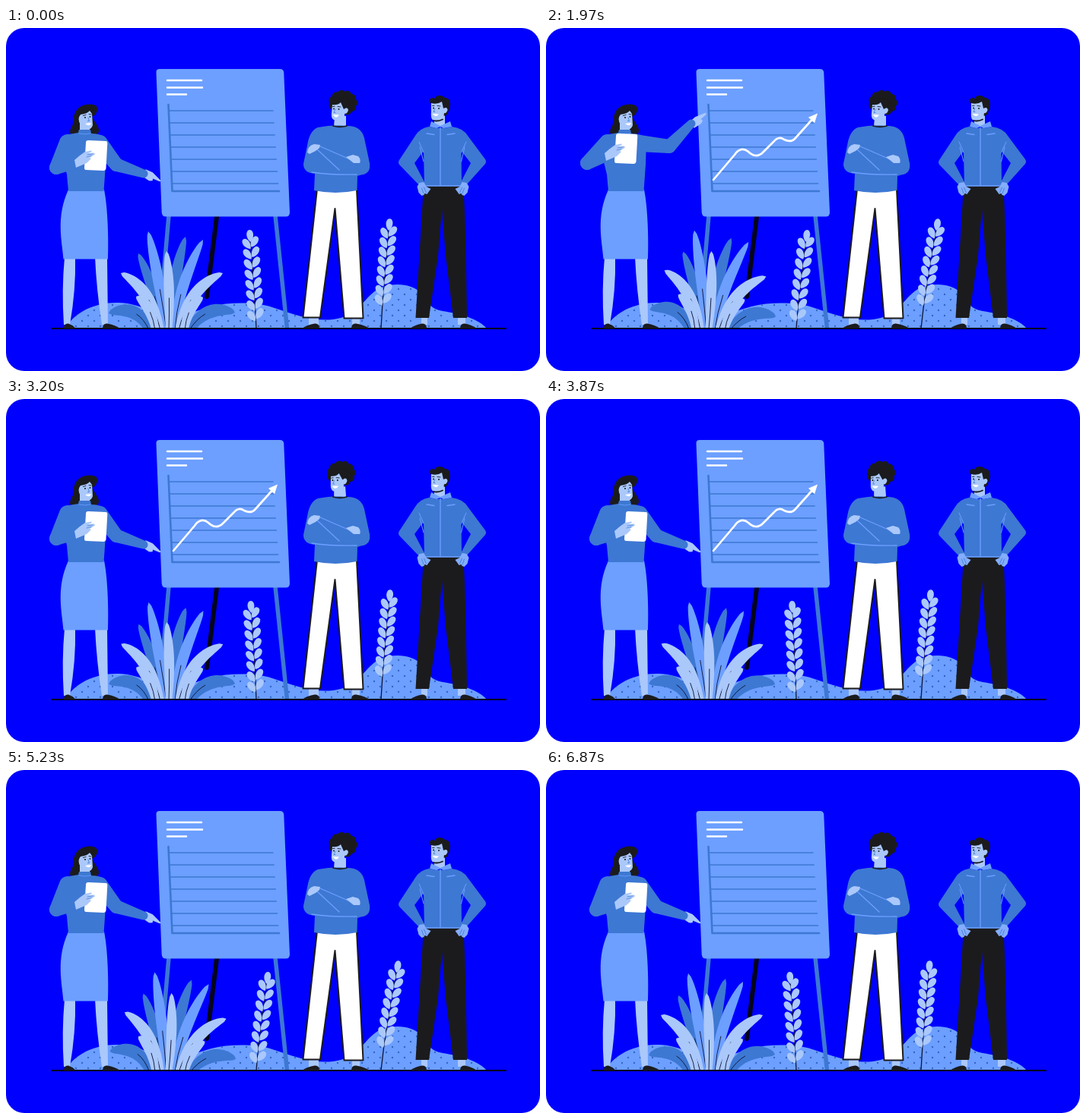
Recreate the animation shown at these times as an HTML page with a canvas. Size 702 by 452 pixels, loop 6930 ms.

```html
<!DOCTYPE html>
<html lang="en">
<head>
<meta charset="utf-8">
<title>Presentation</title>
<style>
  html, body { margin: 0; width: 100%; height: 100%; overflow: hidden; background: #fff; }
  canvas { display: block; }
</style>
</head>
<body>
<canvas id="stage" width="702" height="452"></canvas>
<script>
const LOOP = 6930;
const BLUE = '#0000ff', LIGHT = '#6c9fff', MID = '#3d78d3', PALE = '#abc8fb',
      HAND = '#84adfb', INK = '#1b1b1d', WHITE = '#fff';
const g = document.getElementById('stage').getContext('2d');
g.lineCap = g.lineJoin = 'round';

// ---- helpers ----
const fill = (d, color) => { g.fillStyle = color; g.fill(new Path2D(d)); };
const line = (d, color, width) => {
  g.strokeStyle = color;
  g.lineWidth = width;
  g.stroke(new Path2D(d));
};
const dot = (x, y, r, color) => {
  g.fillStyle = color;
  g.beginPath();
  g.arc(x, y, r, 0, 7);
  g.fill();
};
const within = (x, y, angle, draw) => {
  g.save();
  g.translate(x, y);
  g.rotate(angle);
  draw();
  g.restore();
};
const ease = (t, from, to) => {
  const p = Math.min(1, Math.max(0, (t - from) / (to - from)));
  return p < .5 ? 2 * p * p : 1 - 2 * (1 - p) ** 2;
};
const mix = (a, b, p) => a.map((v, i) => v + (b[i] - v) * p);

// Limb section with a round end of radius r1 and r2
function limb(x1, y1, r1, x2, y2, r2, color) {
  const a = Math.atan2(y2 - y1, x2 - x1);
  g.fillStyle = color;
  g.beginPath();
  g.arc(x1, y1, r1, a + Math.PI / 2, a - Math.PI / 2);
  g.arc(x2, y2, r2, a - Math.PI / 2, a + Math.PI / 2);
  g.fill();
}

// ---- scenery ----
const HILLS = 'M78 396C90 374 118 361 148 362C176 363 188 374 208 380C232 382 250 372 270 367' +
  'C294 361 328 361 350 368C378 377 402 387 430 384C462 380 470 357 486 346' +
  'C502 335 532 335 545 349C555 360 556 370 574 373C600 377 622 384 632 396Z';

function hills() {
  fill(HILLS, LIGHT);
  g.save();
  g.clip(new Path2D(HILLS));
  for (let row = 0; row < 9; row++)
    for (let x = 84 + row % 2 * 8; x < 632; x += 16) dot(x, 344 + row * 7, 1.2, '#3566c4');
  g.restore();
}

const chart = document.createElementNS('http://www.w3.org/2000/svg', 'path');
const CHART = 'M220 200L248 167C253 159 260 158 266 163C272 169 279 170 285 164' +
  'L300 149C304 144 309 144 313 147C319 150 323 150 327 146L353 117';
chart.setAttribute('d', CHART);
const chartLength = chart.getTotalLength();

function board(progress) {
  line('M277 249L264 354', '#05051c', 6);
  hills();
  g.lineCap = 'butt';
  line('M214 247L201 396M354 247L369.5 396', MID, 5.5);
  g.lineCap = 'round';
  fill('M202 54H360Q365 54 365.300 59L373 243Q373 248.500 368 248.500H210Q205 248.500 204.700 243L197.500 59Q197 54 202 54Z', LIGHT);
  line('M212 69H257M212 78.500H258M212 87.500H237', WHITE, 2.5);
  for (let i = 0; i < 7; i++)
    line(`M${215 + i * .6} ${109 + i * 16}H${351 + i * 1.1}`, MID, 1.5);
  line('M213.500 101L218.500 215H359', MID, 2.6);
  if (progress <= 0) return;

  const length = progress * chartLength;
  g.setLineDash([length, 999]);
  line(CHART, WHITE, 2.7);
  g.setLineDash([]);
  const tip = chart.getPointAtLength(length), back = chart.getPointAtLength(length - 3);
  within(tip.x, tip.y, Math.atan2(tip.y - back.y, tip.x - back.x),
    () => fill('M-6 -5.500L6 0L-6 5.500Z', WHITE));
}

// ---- plants ----
// Bush leaves: base x, control x and y, tip x and y, half width, colour
const LEAVES = [
  [188, 172, 362, 135, 376, 9, MID], [241, 264, 362, 301, 375, 9, MID],
  [207, 194, 340, 174, 297, 7, MID], [218, 217, 335, 236, 275, 8, MID],
  [211, 201, 330, 187, 268, 7.5, LIGHT], [222, 226, 340, 259, 279, 7.5, LIGHT],
  [203, 189, 341, 151, 323, 8, PALE], [227, 241, 341, 285, 323, 8, PALE],
  [196, 191, 364, 171, 354, 7.5, PALE], [235, 238, 365, 259, 355, 7.5, PALE],
  [214, 216, 345, 211, 294, 7, PALE]
];

function bushLeaf([bx, cx, cy, tx, ty, w, color]) {
  const by = 398, left = [], right = [];
  for (let s = 0; s <= 1.001; s += .04) {
    const r = 1 - s;
    const x = r * r * bx + 2 * r * s * cx + s * s * tx, y = r * r * by + 2 * r * s * cy + s * s * ty;
    const dx = r * (cx - bx) + s * (tx - cx), dy = r * (cy - by) + s * (ty - cy);
    const h = w * (.6 + .4 * Math.sin(2.5 * s)) * Math.sqrt(Math.max(0, 1 - s ** 4)) / Math.hypot(dx, dy);
    left.push(`${x - dy * h} ${y + dx * h}`);
    right.unshift(`${x + dy * h} ${y - dx * h}`);
  }
  fill('M' + left.concat(right).join('L') + 'Z', color);
  // Vein along the lower part
  const m = .4, mx = bx + (cx - bx) * m, my = by + (cy - by) * m;
  const ex = (1 - m) * mx + m * (cx + (tx - cx) * m), ey = (1 - m) * my + m * (cy + (ty - cy) * m);
  line(`M${bx} ${by}Q${mx} ${my} ${ex} ${ey}`, '#0c1233', .9);
}

function bush(sway) {
  g.save();
  g.beginPath();
  g.rect(0, 0, 702, 396);
  g.clip();
  g.translate(213, 396);
  g.rotate(.065 * sway);
  g.translate(-213, -396);
  LEAVES.forEach(bushLeaf);
  g.restore();
}

function sprig(x, lean, height, low, pairs) {
  const at = s => [x + lean * s ** 1.2, 396 - height * s];
  const tilt = Math.atan2(lean, height);
  line('M' + [0, .2, .4, .6, .8, .9].map(s => at(s).join(' ')).join('L'), '#101438', 1.3);
  const leaf = (s, turn) => within(...at(s), tilt + turn, () =>
    fill('M0 -1C-4.500 -5 -6 -12 -2.500 -16Q0 -18 2.500 -16C6 -12 4.500 -5 0 -1Z', PALE));
  for (let i = 0; i < pairs; i++) {
    const s = low + (.8 - low) * i / (pairs - 1);
    leaf(s, -.58);
    leaf(s + .02, .58);
  }
  leaf(.87, 0);
}

// ---- people ----
const shoe = (x, dir, length) =>
  fill(`M${x} 396Q${x} 389 ${x + dir * 6} 389.500Q${x + dir * length * .7} 391 ${x + dir * length} 396Z`, INK);

// Elbow, wrist and hand angle of the pointing arm
const POSES = [[145, 180, 184, 192, .48], [157, 170, 193, 161, -.22], [162, 156, 194, 126, -.68]];

function woman(raise, hold) {
  fill('M77 302H91Q92 345 84 391H76Q73 345 77 302ZM117 302H133L134 391H126Q119 345 117 302Z', PALE);
  shoe(76, 1, 16);
  shoe(127, 1, 23);
  fill('M82 213H129C134 238 135 280 134 304.500H75.500C74 282 65 250 82 213Z', LIGHT);

  // Head
  fill('M89 117C91 127 84 130 84 138C89 143 94 142 98 140H117C124 140 123 132 119 127L113 117C120 114 122 106 118 102' +
    'C109 98 92 101 89 117Z', INK);
  fill('M97 125V140H110V130Z', PALE);
  fill('M98 114Q107 113 110 109L113 113L114 128Q112 135 106 133L98 127Q93 120 98 114Z', PALE);
  dot(104, 118, 1, INK);
  dot(110.500, 117, 1, INK);
  line('M101.500 115.500L105 114.500M109 113.500L112 114', INK, .9);
  line('M108 118L109.500 122.500H107.500', MID, .8);
  fill('M104 126L112 125Q110 131 104 126Z', WHITE);

  // Sweater and pointing arm
  fill('M74 143Q85 139 95 138L96 134H111L112 139Q126 139 132 146L131 180L128.500 215H82L80 193L72 160Z', MID);
  line('M96 139Q104 141 111 139', LIGHT, .8);
  const k = raise < 1 ? 0 : 1;
  const [ex, ey, wx, wy, angle] = mix(POSES[k], POSES[Math.min(2, k + 1)], raise - k);
  within(wx, wy, angle, () =>
    fill('M-3 -5L7 -5.500L21 -1.200Q22 .5 20 1L11 1.500L12 4Q9 7 5 6L-3 5Z', PALE));
  limb(123, 152, 11, ex, ey, 9, MID);
  limb(ex, ey, 9, wx - 3, wy, 5.5, MID);

  // Arm with the tablet
  const [px, py, hx, hy] = mix([66, 184, 90, 179], [54, 178, 77, 170], hold);
  limb(81, 151, 11, px, py, 9, MID);
  limb(px, py, 9, hx, hy, 7, MID);
  within(-13 * hold, -9 * hold, 0, () => {
    fill('M108 148L131 149Q133.500 149 133.300 152L131.500 185Q131 188 128 188L105 187Q103 187 103 184L105 151Q105 148 108 148Z', WHITE);
    fill('M90 174L97 168L104 163L112 161.500L113 163L108 165L116 164.500L117 166.500L110 171L112 172L106 178L92 184Z', PALE);
    line('M107 167L114 166M106 170L112 168.500', MID, .7);
  });
}

function crossedArmsMan(turn) {
  fill('M398 380H411V391H398ZM455 380H465V391H455Z', PALE);
  shoe(412, -1, 23);
  shoe(454, 1, 24);
  const pants = 'M409 212L390.500 381.500H413L432.500 238L444.500 382.500H469.500L461 212Z';
  fill(pants, WHITE);
  line(pants, INK, 2);

  within(438, 128, turn, () => {
    g.translate(-438, -128);
    fill('M432 116H447V131H431Z', PALE);
    // Curly hair
    dot(443, 98, 14, INK);
    for (let a = 0; a < 6.2; a += .57)
      dot(443 + 13.5 * Math.cos(a), 98.5 + 11.5 * Math.sin(a), 5.5, INK);
    fill('M429 101Q436 102 440 98L444 107Q449 103 450 108Q449 113 445 113V118Q440 123 431 121Q427 119 428 112Z', PALE);
    dot(431, 106.500, 1, INK);
    dot(437.500, 107, 1, INK);
    line('M429.500 103.500L432 103.300M436 103.500L440 104', INK, .9);
    line('M433 107L431 111.500H433', MID, .8);
    fill('M429.500 114L438 114.500Q434 121 429.500 114Z', WHITE);
  });

  fill('M410 131Q430 127 449 129Q467 129 471 145L478 178Q480 192 467 193.500L462 195L461.500 214Q433 220 405 214' +
    'L406 192Q391 191 391 179L396 155Q399 135 410 131Z', MID);
  line('M430 129Q439 131.500 448 129', INK, 1.8);
  line('M409 160L438 187M413 156L452 173M402 190Q430 194 461 193', LIGHT, 1.3);
  fill('M396 164Q397 155 405 153L413 154L412 158L407 162L399 166Z', PALE);
  fill('M447 170L456 167L463 169Q467 173 465 178L457 178Z', PALE);
}

function jacketMan() {
  fill('M546 378H554V391H546ZM594 378H604V391H594Z', PALE);
  shoe(553, -1, 22);
  shoe(597, 1, 22);
  fill('M549 207H601Q604 240 606 382H588L578 300L573 239L568 300L556 382H538.500L544 290Z', INK);

  // Head
  fill('M563 115H577V129H563Z', PALE);
  fill('M558 99C555 92 561 91 564 93C565 87 575 89 577 92C584 92 585 100 583 106L580 114L576 116L564 102Z', INK);
  fill('M559 99Q567 101 573 97L575 106Q580 103 580.500 108Q579 113 576 112L575 119Q569 123 561 121Q558 119 559 110Z', PALE);
  line('M562 122Q568 123.500 574 120.500', INK, 1.8);
  dot(562, 105.500, 1, INK);
  dot(569, 106, 1, INK);
  line('M560.500 102.500L563 102.300M567 102.500L571 103', INK, .9);
  line('M564 106L562 110.500H564', MID, .8);
  fill('M560.500 113L569 113.500Q565 119 560.500 113Z', WHITE);

  // Jacket with both arms on the hips
  fill('M556 130Q571 134 586 130Q601 132 607 142L630 173Q632 176 630 179L605 207L598 203L611 178L598.500 162' +
    'L599 208.500H550L549 162L537 178L550 203L543 207L517 180Q515 177 517 174L538 142Q544 132 556 130Z', MID);
  fill('M559 123L571 129L584 123L586 130L575 132L571 130L566 132L557 130Z', LIGHT);
  line('M571 131V208M550 208H599M553 139L563 140.500M580 140.500L590 139', LIGHT, 1.3);
  line('M543 150L549 164M605 150L598.500 164M544 157L549 176M603 157L598.500 176', LIGHT, 1);
  for (const side of [-1, 1]) {
    g.save();
    g.translate(574.500, 0);
    g.scale(side, 1);
    fill('M25 203L31 204L34 209L32 217L28 221L25 220L24 218L21 219L19 216L16 212L22 209Z', HAND);
    line('M28 211L25.500 218M25 210L22 217', MID, .8);
    g.restore();
  }
}

// ---- animation ----
function draw(now) {
  const t = now % LOOP;
  const sway = (1 - Math.cos(4 * Math.PI * t / LOOP)) / 2;
  const raise = 2 * (ease(t, 100, 1580) - ease(t, 2130, 2710));
  const hold = ease(t, 70, 670) - ease(t, 2200, 2800);
  const growth = ease(t, 400, 1500) - ease(t, 4350, 5050);
  const turn = -.075 * (ease(t, 2750, 3200) - ease(t, 3880, 4280));

  g.clearRect(0, 0, 702, 452);
  g.fillStyle = BLUE;
  g.beginPath();
  g.roundRect(0, 0, 702, 452, 24);
  g.fill();

  board(growth);
  bush(sway);
  sprig(329, -9 + 25 * sway, 130, .07, 8);
  sprig(493, 12 + 12 * sway, 147, .2, 8);
  line('M60 396H657', '#05050f', 2);
  woman(raise, hold);
  crossedArmsMan(turn);
  jacketMan();
  requestAnimationFrame(() => draw(performance.now()));
}
draw(performance.now());
</script>
</body>
</html>
```
